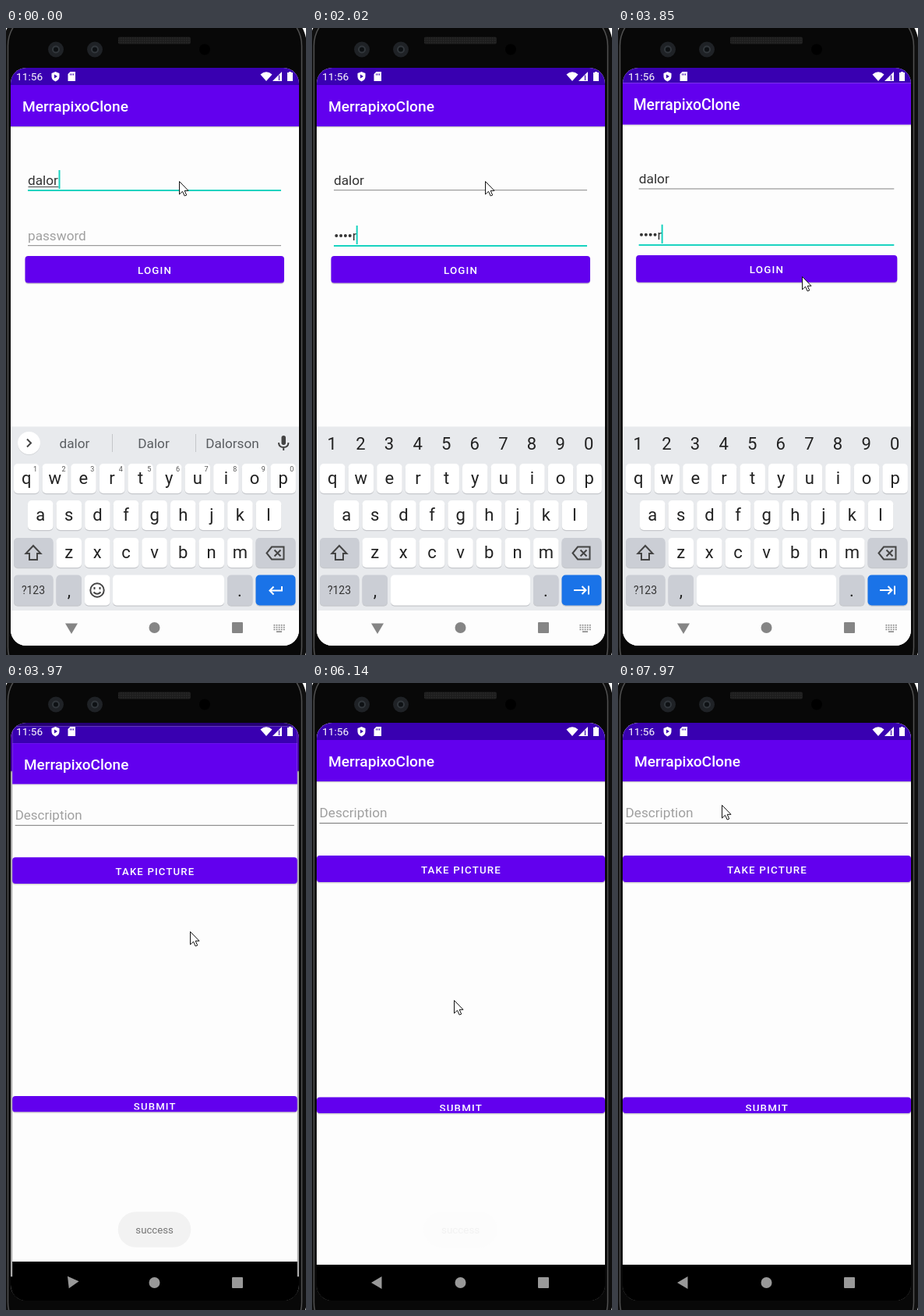
These frames come from a looping animation (385 by 803 pixels, 8 s). An HTML page:

```html
<!DOCTYPE html>
<html lang="en">
<head>
<meta charset="utf-8">
<title>Login to post</title>
<style>
html, body { margin: 0; width: 100%; height: 100%; overflow: hidden; background: #fff; }
svg { display: block; width: 385px; height: 803px; font-family: Roboto, sans-serif; }
text { white-space: pre; }
.title { font-size: 19.2px; font-weight: 500; fill: #fff; }
.field { font-size: 17.2px; fill: #333; }
.hint { fill: #a0a0a0; }
.caps { font-size: 13.3px; font-weight: 500; letter-spacing: 1.19px; fill: #fff; }
.mid { text-anchor: middle; }
.key { font-size: 22px; fill: #222; text-anchor: middle; }
.small { font-size: 9px; fill: #555; text-anchor: middle; }
.word { font-size: 17.2px; fill: #5a5d61; text-anchor: middle; }
.line { fill: none; stroke: #444; stroke-width: 2; }
</style>
</head>
<body>
<svg viewBox="0 0 385 803">
  <defs>
    <clipPath id="screen"><rect x="6" y="51" width="370" height="740" rx="20"/></clipPath>
    <clipPath id="cut"><rect x="6" y="530" width="370" height="18"/></clipPath>
    <pattern id="mesh" width="3" height="3" patternUnits="userSpaceOnUse">
      <rect width="3" height="3" fill="#1d1d1d"/><rect width="1.5" height="1.5" fill="#292929"/>
    </pattern>
    <g id="bars">
      <rect x="6" y="51" width="370" height="22" fill="#3900b1"/>
      <rect x="6" y="126" width="370" height="1" fill="#ccc"/>
      <rect x="6" y="127" width="370" height="1" fill="#eee"/>
      <rect x="6" y="73" width="370" height="53" fill="#6200ee"/>
      <text class="title" x="21" y="107">MerrapixoClone</text>
    </g>
  </defs>

  <rect x="-4" y="-24" width="390" height="860" rx="46" fill="#101010"/>
  <rect x="2.500" y="-22" width="377" height="860" rx="45" fill="#080808" stroke="#505050" stroke-width="1.500"/>
  <rect x="144" y="11.500" width="93" height="9" rx="2" fill="url(#mesh)"/>
  <g fill="#1f2226">
    <circle cx="64" cy="27.500" r="10"/><circle cx="114" cy="27.500" r="10"/>
    <g fill="#32373c"><circle cx="64" cy="27.500" r="5"/><circle cx="114" cy="27.500" r="5"/></g>
    <g fill="#0e1114"><circle cx="64" cy="27.500" r="3"/><circle cx="114" cy="27.500" r="3"/></g>
  </g>
  <circle cx="255" cy="27.500" r="7" fill="#000"/>

  <g clip-path="url(#screen)">
    <g id="login">
      <rect x="6" y="51" width="370" height="740" fill="#fdfdfd"/>
      <use href="#bars"/>
      <text class="field" x="28" y="201">dalor</text>
      <rect id="composing" x="28.500" y="203" width="39" height="1" fill="#444"/>
      <rect id="nameLine" x="28" width="325"/>
      <text class="field" id="password" x="28" y="272"></text>
      <g id="dots" fill="#333"></g>
      <rect id="passLine" x="28" width="325"/>
      <rect id="caret" width="2" height="24" fill="#18d3c0"/>
      <rect x="24.500" y="293.500" width="332.500" height="34.500" rx="4" fill="#000" opacity=".17"/>
      <rect id="loginButton" x="24.500" y="292" width="332.500" height="34.500" rx="4"/>
      <text class="caps" x="169" y="314.500">LOGIN</text>
      <rect id="navDark" x="6" y="745" width="370" height="46"/>
    </g>
    <g id="keyboard"></g>
    <rect id="dim" x="6" y="51" width="370" height="740" opacity=".33"/>

    <g id="post">
      <rect x="6" y="51" width="370" height="694" fill="#fdfdfd"/>
      <rect x="6" y="745" width="370" height="55"/>
      <use href="#bars"/>
      <text class="field hint" x="9.500" y="172">Description</text>
      <rect x="9.500" y="179" width="362.500" height="1" fill="#777"/>
      <g fill="#000" opacity=".17">
        <rect x="6" y="222.500" width="370" height="34" rx="4"/>
        <rect x="6" y="532" width="370" height="20.500" rx="4"/>
      </g>
      <g fill="#6200ee">
        <rect x="6" y="221" width="370" height="34" rx="4"/>
        <rect x="6" y="530.500" width="370" height="20.500" rx="4"/>
      </g>
      <text class="caps" x="140" y="243.500">TAKE PICTURE</text>
      <text class="caps" x="163.500" y="549" clip-path="url(#cut)">SUBMIT</text>
    </g>

    <g fill="#fff">
      <text x="13" y="67" font-size="13.700">11:56</text>
      <path d="M63.500 56l5 2v4q0 4.500-5 6.500q-5-2-5-6.500v-4z"/>
      <path d="M62 59.500v5l4-2.500z" fill="#3900b1"/>
      <path d="M82.500 56h6.500v12h-9.500v-9z"/>
      <path d="M82.500 58.500v2M84.500 58.500v2M86.500 58.500v2" stroke="#3900b1"/>
      <path d="M326.500 59.500q7.500-6.500 15 0l-7.500 8.500z"/>
      <path d="M354 56v12h-12z"/>
      <path d="M363 56h3v1h2v11h-7v-11h2z"/>
    </g>
    <path d="M350.500 60.500v6.500" stroke="#3900b1" stroke-width="1.200"/>
    <g id="nav">
      <path id="back" d="M76 768l13.500-8v16z"/>
      <circle cx="190.500" cy="768" r="7"/>
      <rect x="290" y="761" width="14" height="14" rx="1"/>
    </g>
    <g id="toast">
      <rect x="143" y="677" width="95" height="46" rx="23" fill="#eee"/>
      <text x="166" y="705" font-size="13.400" fill="#3c3c3c">success</text>
    </g>
  </g>
  <path id="mouse" d="M.5 .5V17L4.500 13.300L7.200 19L9.700 18L7.200 12.300H12z" fill="#fff" stroke="#111"/>
</svg>
<script>
const $ = id => document.getElementById(id);
const LOOP = 8000, TEAL = '#18d3c0', SECRET = 'dalor', DOT_PITCH = 5.8;

function add(parent, tag, attrs, text) {
  const el = document.createElementNS('http://www.w3.org/2000/svg', tag);
  for (const name in attrs) el.setAttribute(name, attrs[name]);
  if (text) el.textContent = text;
  parent.append(el);
  return el;
}
const set = (id, attrs) => {
  for (const name in attrs) $(id).setAttribute(name, attrs[name]);
};
const show = (id, on) => { $(id).style.display = on ? '' : 'none'; };
const zoom = (scale, x, y) => `translate(${x} ${y}) scale(${scale}) translate(${-x} ${-y})`;

const board = $('keyboard');
const PITCH = 36.6;
const box = (parent, x, y, width, height, fill, rx = 0) =>
  add(parent, 'rect', { x, y, width, height, fill, rx });
const label = (parent, cls, x, y, text) => add(parent, 'text', { class: cls, x, y }, text);
const stroke = (parent, d, extra) => add(parent, 'path', { class: 'line', d, ...extra });

function key(parent, x, y, width, fill = '#fff', height = 38) {
  box(parent, x, y + 1.2, width, height, '#c6c8cc', 5);
  box(parent, x, y, width, height, fill, 5);
}

function buildKeyboard() {
  const GRAY = '#cbced5';
  box(board, 6, 510.5, 370, 236, '#e8eaed');
  box(board, 6, 746, 370, 45, '#fdfdfd');
  const rows = [['qwertyuiop', 10, 558], ['asdfghjkl', 28, 605], ['zxcvbnm', 64.5, 653]];
  for (const [letters, left, top] of rows)
    [...letters].forEach((letter, i) => {
      key(board, left + i * PITCH, top, 32.5);
      label(board, 'key', left + i * PITCH + 16.2, top + 26, letter);
    });

  key(board, 10, 653, 50.5, GRAY);
  stroke(board, 'M35 663l9.500 10h-4.500v8h-10v-8h-4.500z');
  key(board, 320.5, 653, 51, GRAY);
  stroke(board, 'M341 664.500h15.500v16h-15.500l-6.500-8zM344.500 668.500l8 8M352.500 668.500l-8 8');

  key(board, 10, 700.5, 50.5, GRAY, 39);
  add(board, 'text', { x: 35, y: 725, 'font-size': 14, fill: '#333', class: 'mid' }, '?123');
  key(board, 64.5, 700.5, 32.5, GRAY, 39);
  label(board, 'key', 81, 728, ',');
  key(board, 284, 700.5, 32.5, GRAY, 39);
  label(board, 'key', 300, 728, '.');
  key(board, 320.5, 700.5, 51, '#1a73e8', 39);

  const words = add(board, 'g', { id: 'words' });
  [['dalor', 88], ['Dalor', 189.5], ['Dalorson', 290.5]].forEach(([word, x]) => label(words, 'word', x, 538, word));
  for (const x of [136, 243]) box(words, x, 520, 1, 23, '#c4c6c9');
  add(words, 'circle', { cx: 29.5, cy: 532.5, r: 14.5, fill: '#d4d6d9' });
  add(words, 'circle', { cx: 29.5, cy: 531.5, r: 14.5, fill: '#fff' });
  stroke(words, 'M27 526.500l5 5l-5 5');
  box(words, 353.5, 522, 5.5, 12, '#444', 2.7);
  stroke(words, 'M350 531q0 6 6.200 6q6.200 0 6.200-6M356.200 537v4', { 'stroke-width': 1.6 });
  [...'1234567890'].forEach((n, i) => label(words, 'small', 37.5 + i * PITCH, 568, n));
  key(words, 101, 700.5, 32.5, '#fff', 39);
  add(words, 'circle', { cx: 117, cy: 720, r: 8.7, class: 'line' });
  stroke(words, 'M112.500 722.500q4.500 4.500 9 0M113.500 716v3M120.500 716v3');
  key(words, 137, 700.5, 143, '#fff', 39);
  stroke(words, 'M354 715v5.500h-15.500M343.500 715.500l-5 5l5 5', { style: 'stroke:#fff' });

  const digits = add(board, 'g', { id: 'digits' });
  [...'1234567890'].forEach((n, i) => label(digits, 'key', 25.8 + i * PITCH, 540, n));
  key(digits, 101, 700.5, 179, '#fff', 39);
  stroke(digits, 'M336 720h15M346.500 715l5 5l-5 5M355 714.500v11', { style: 'stroke:#fff' });

  for (let i = 0; i < 15; i++) box(board, 343.5 + i % 5 * 3.1, 764 + Math.floor(i / 5) * 2.8, 1.8, 1.6, '#888');
  box(board, 347, 772.4, 7, 1.6, '#888');
}
buildKeyboard();
for (let i = 0; i < SECRET.length - 1; i++)
  add($('dots'), 'circle', { cx: 31.3 + i * DOT_PITCH, cy: 266, r: 2 });

// Each row: start time in ms, then the values held until the next row.
const typed = [[0, 0], [1480, 1], [1630, 2], [1750, 3], [1900, 4], [2020, 5]];
const caretOn = [[0, 1], [530, 0], [960, 1], [2550, 0], [3090, 1]];
const buttonFill = [[0, '#6200ee'], [3210, '#893ef2'], [3330, '#7a29f0'], [3450, '#6200ee']];
// Progress of the page change and the angle of the back arrow.
const opening = [[0, 0, -90], [3850, .16, -90], [3970, .92, -66], [4120, .99, -8], [4270, 1, 0]];
const toastAlpha = [[0, 0], [3970, .7], [4120, .95], [4270, 1],
  [5840, .8], [5990, .38], [6140, .05], [6260, 0]];
const pointer = [[0, 222, 196], [2550, 288, 242], [2670, 274, 274], [2820, 246, 306], [2940, 236, 317],
  [3090, 236, 318], [5450, 224, 462], [5570, 228, 566], [5720, 222, 590], [5840, 212, 582], [5990, 204, 542],
  [6140, 182, 406], [6260, 202, 364], [6380, 222, 343], [6530, 227, 312], [6650, 222, 268],
  [6770, 211, 230], [6890, 201, 208], [7040, 197, 209], [7190, 187, 218], [7310, 172, 172],
  [7430, 157, 137], [7580, 138, 178], [7700, 130, 168], [7850, 132, 160], [7970, 133, 156]];

const at = (steps, t) => steps.findLast(step => step[0] <= t).slice(1);

function drawLogin(t) {
  const onPassword = t >= 960, [count] = at(typed, t);
  show('composing', !onPassword);
  const line = (active, y) => active
    ? { y, height: 2, fill: TEAL }
    : { y, height: 1.2, fill: '#999' };
  set('nameLine', line(!onPassword, 207));
  set('passLine', line(onPassword, 278));

  const hidden = Math.max(0, count - 1), text = $('password');
  text.textContent = count ? SECRET[hidden] : 'password';
  text.classList.toggle('hint', !count);
  text.setAttribute('x', 28 + hidden * DOT_PITCH + (hidden ? .5 : 0));
  [...$('dots').children].forEach((dot, i) => dot.style.display = i < hidden ? '' : 'none');

  const glyph = { d: 9.5, a: 9, l: 4, o: 9.5, r: 5.5 };
  const caretX = !onPassword ? 67.5 : count ? 28 + hidden * DOT_PITCH + glyph[SECRET[hidden]] : 28;
  set('caret', { x: caretX, y: onPassword ? 253 : 182 });
  show('caret', at(caretOn, t)[0]);
  set('loginButton', { fill: at(buttonFill, t)[0] });
  show('words', t < 1110);
  show('digits', t >= 1110);
}

function draw(t) {
  drawLogin(t);
  const opened = t >= 3970, [progress, turn] = at(opening, t);
  show('keyboard', !opened);
  for (const id of ['dim', 'navDark', 'post']) show(id, opened);
  set('login', { transform: zoom(1 + .05 * progress, 191, 413) });
  set('post', { transform: zoom(.85 + .15 * progress, 191, 413) });
  set('nav', { fill: opened ? '#999' : '#858585' });
  set('back', { transform: `rotate(${turn} 84 768)` });
  set('toast', { opacity: at(toastAlpha, t)[0], transform: zoom(t < 4270 ? .985 : 1, 190.5, 700) });
  set('mouse', { transform: `translate(${at(pointer, t).join(' ')})` });
}

const start = performance.now();
function tick() {
  draw((performance.now() - start) % LOOP);
  requestAnimationFrame(tick);
}
tick();
</script>
</body>
</html>
```
